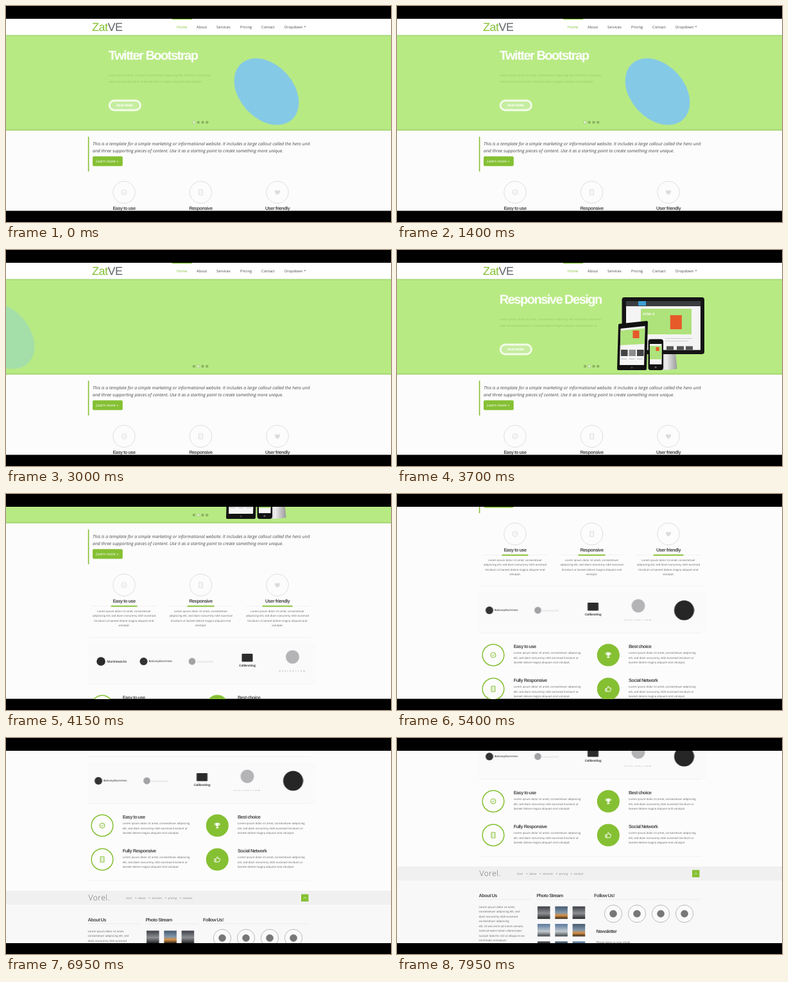
Animation, 600 px wide and 338 px high, one loop 8000 ms. Source, as an HTML page:

```html
<!DOCTYPE html>
<html lang="en">
<head>
<meta charset="utf-8">
<title>Template tour</title>
<style>
html, body { margin: 0; width: 100%; height: 100%; overflow: hidden; background: #000; }
svg { display: block; width: 100%; height: 100%; }
text { font-family: "Open Sans", "Noto Sans", sans-serif; text-rendering: geometricPrecision; white-space: pre; }
.head { font: bold 7.4px "Liberation Sans", sans-serif; letter-spacing: -.075em; fill: #4c4c4c; }
.title { font: bold 20px "Liberation Sans", sans-serif; letter-spacing: -.075em; fill: #fff; }
.nav { font-size: 5.75px; fill: #484848; }
.body { font-size: 4.3px; fill: #606060; }
.intro { font-size: 6.89px; font-style: italic; fill: #484848; }
.blurb { font-size: 4.7px; font-style: italic; fill: #96c468; }
.mid { text-anchor: middle; }
.line { fill: none; stroke: currentColor; }
</style>
</head>
<body>
<svg viewBox="0 0 600 338" preserveAspectRatio="none">
  <defs>
    <clipPath id="view"><rect y="20" width="600" height="300.5"/></clipPath>
    <clipPath id="strip"><rect x="128" y="374" width="354" height="72"/></clipPath>
    <linearGradient id="hero" x2="0" y2="1">
      <stop stop-color="#a5d576"/><stop offset=".02" stop-color="#b8ea84"/>
      <stop offset=".98" stop-color="#b8ea84"/><stop offset="1" stop-color="#a0d070"/>
    </linearGradient>
    <linearGradient id="silver" x2="1">
      <stop stop-color="#9a9a9a"/><stop offset=".5" stop-color="#eee"/><stop offset="1" stop-color="#999"/>
    </linearGradient>
    <linearGradient id="storm" x2="0" y2="1">
      <stop stop-color="#3c3f45"/><stop offset=".55" stop-color="#8d8f93"/><stop offset="1" stop-color="#29292b"/>
    </linearGradient>
    <linearGradient id="dusk" x2="0" y2="1">
      <stop stop-color="#44596f"/><stop offset=".5" stop-color="#8398aa"/>
      <stop offset=".72" stop-color="#d98f43"/><stop offset="1" stop-color="#30291f"/>
    </linearGradient>
    <linearGradient id="sky" x2="0" y2="1">
      <stop stop-color="#56779b"/><stop offset=".6" stop-color="#c3cad0"/><stop offset="1" stop-color="#42464a"/>
    </linearGradient>
  </defs>
  <rect width="600" height="338"/>
  <g clip-path="url(#view)">
    <rect width="600" height="338" fill="#fdfcfd"/>
    <g id="page"></g>
  </g>
</svg>
<script>
const LOOP = 8000, GREEN = '#85c033';
const LOREM = ['Lorem ipsum dolor sit amet, consectetuer', 'adipiscing elit, sed diam nonummy nibh euismod',
  'tincidunt ut laoreet dolore magna aliquam erat', 'volutpat.'];
const WIDE = ['Lorem ipsum dolor sit amet, consectetuer adipiscing',
  'elit, sed diam nonummy nibh euismod tincidunt ut', 'laoreet dolore magna aliquam erat volutpat.'];

const text = (x, y, cls, words, extra = '') => `<text x="${x}" y="${y}" class="${cls}" ${extra}>${words}</text>`;
const lines = (x, y, step, cls, rows) => rows.map((row, i) => text(x, y + i * step, cls, row)).join('');
const rect = (x, y, w, h, fill, r = 0) => `<rect x="${x}" y="${y}" width="${w}" height="${h}" rx="${r}" fill="${fill}"/>`;
const disc = (x, y, r, fill, stroke = 'none', width = 1) =>
  `<circle cx="${x}" cy="${y}" r="${r}" fill="${fill}" stroke="${stroke}" stroke-width="${width}"/>`;
const rule = (x, y, w, color = '#ececec') => rect(x, y, w, .6, color);

const ICONS = {
  check: '<circle r="4" class="line"/><path class="line" d="M-1.8 0l1.4 1.5 2.6-3"/>',
  tower: '<path class="line" d="M-3 4.2v-8.4h6v8.4z"/><path class="line" stroke-dasharray="1 1" d="M-1.2-2.6v6M1.2-2.6v6"/>',
  heart: '<path fill="currentColor" d="M0 4C-7-.8-3.4-5.6 0-2.2 3.4-5.6 7-.8 0 4z"/>',
  cup: '<path fill="currentColor" d="M-2.4-4.2h4.8c0 4-.8 5-1.8 5.6v1.4h1.6v1.4h-4.4v-1.4h1.6V1.4C-1.6.8-2.4-.2-2.4-4.2z"/><path class="line" d="M-2.2-3h-2q0 2.6 2.4 3M2.2-3h2q0 2.6-2.4 3"/>',
  thumb: '<path class="line" d="M-4.4-.6h2v4.4h-2zM-2.4-.4L0-4.2q1.6 0 .8 2.8h3q.8.4.4 1.4l-1 3.4q-.4.6-1 .6h-4.6"/>'
};
const icon = (name, x, y, color) => `<g transform="translate(${x} ${y})" color="${color}">${ICONS[name]}</g>`;

const header = () => rect(0, 19, 600, 26, '#fff') + rect(259, 19, 31, 2.2, GREEN) +
  `<text x="134" y="38.5" style="font:18px 'Liberation Sans',sans-serif;letter-spacing:-.5px" fill="#606468"><tspan fill="${GREEN}">Zat</tspan>VE</text>` +
  [['Home', 266], ['About', 297], ['Services', 328], ['Pricing', 365], ['Contact', 398], ['Dropdown', 434]]
    .map(([word, x], i) => text(x, 34.6, 'nav', word, i ? '' : `style="fill:${GREEN}"`)).join('') +
  '<path d="M464.5 31.6h3l-1.5 1.8z" fill="#777"/>';

const caption = (n, title, rows) =>
  `<g id="title${n}">${text(159.8, 84, 'title', title)}</g>` +
  `<g id="blurb${n}">${lines(160, 109.9, 10, 'blurb', rows)}</g>` +
  `<g id="more${n}"><rect x="161.2" y="148" width="48.2" height="15" rx="7.5" fill="#c6eda0" stroke="#f4fbec" stroke-width="2.8"/>` +
  text(185, 157.4, 'mid', 'READ MORE', `style="font:bold 4.7px 'Liberation Sans',sans-serif;letter-spacing:-.35px" fill="#fff"`) + '</g>';

const tablet = () =>
  '<path d="M347 117.5L389 113L387 186L345 186z" fill="#121212" stroke="#121212" stroke-width="4" stroke-linejoin="round"/>' +
  '<path d="M348.5 123L386.5 119L385 180L347 180z" fill="#f5f5f5"/>' +
  '<path d="M348.5 126L386.4 122.5L386 147L348 149z" fill="#aee27a"/>' +
  rect(367.5, 126, 10, 12, '#e8592a') + [349, 361.5, 374].map((x, i) => rect(x, 156, 10.5, 10, i % 2 ? '#8c8c8c' : '#444')).join('') +
  [349, 361.5, 374].map(x => rect(x, 170, 9, 1, '#bbb')).join('') + disc(366, 184, 1.5, '#444');

const devices = () =>
  '<path d="M411 160h23l2.5 26q-16 3-34 1z" fill="url(#silver)"/>' +
  rect(350.5, 74, 128.5, 89, '#151515', 4) + rect(357, 80, 116, 76.5, '#f4f4f4') +
  rect(357, 80, 116, 8, '#3a3d40') + rect(376, 80, 12, 7, '#3f9fd0') +
  rect(380, 92, 79, 40, '#aee27a', 1) + text(383, 102, '', 'HTML 5', 'font-size="5" font-weight="700" fill="#fff"') +
  rect(425.8, 102, 18, 22, '#e8592a') + rect(418, 138, 42, 1, '#ccc') + rect(418, 142, 36, 1, '#ccc') +
  [420, 436, 450].map(x => rect(x, 150.5, 11, 6, '#555')).join('') +
  tablet() +
  rect(391.5, 139.5, 23.5, 48.5, '#121212', 4) + rect(394, 147, 18.5, 32, '#f5f5f5') + rect(394, 150, 18.5, 21, '#aee27a') +
  rect(403.5, 152, 5, 6, '#e8592a') + disc(403, 183.5, 1.8, '#555');

const hero = () => rect(0, 45.4, 600, 149.6, 'url(#hero)') +
  caption(1, 'Twitter Bootstrap', ['Lorem ipsum dolor sit amet, consectetuer adipiscing elit, sed diam nonummy',
    'nibh euismod tincidunt ut laoreet dolore magna aliquam erat volutpat']) +
  '<g id="image1"><ellipse rx="59" ry="42" transform="translate(406 134) rotate(48)" fill="#84c9e6"/></g>' +
  caption(2, 'Responsive Design', ['Lorem ipsum dolor sit amet, consectetuer adipiscing elit, sed diam nonummy',
    'nibh euismod tincidunt ut laoreet dolore magna aliquam erat volutpat. Ut']) +
  `<g id="image2">${devices()}</g>` +
  [0, 1, 2, 3].map(i => disc(293 + i * 6.75, 182, 2.3, '#8db563')).join('') +
  `<g id="dot">${disc(293, 182, 1.9, '#fff', '#9fc776', .6)}</g>`;

const intro = () => rect(127.8, 204.5, 1.6, 54.5, GREEN) +
  lines(135, 217.6, 11, 'intro', [
    'This is a template for a simple marketing or informational website. It includes a large callout called the hero unit',
    'and three supporting pieces of content. Use it as a starting point to create something more unique.']) +
  rect(135, 235.2, 46.8, 15.2, GREEN, 2) + text(140, 245, 'intro', 'Learn more »', 'style="fill:#fff;font-size:6.1px"');

const feature = (x, name, head, w) => disc(x, 291.5, 17.2, '#fdfcfd', '#d9d9dc', .9) + icon(name, x, 291.5, '#dcdcdf') +
  text(x, 319, 'head mid', head) + rule(x - 50, 324.4, 100) + rect(x - w / 2, 323.6, w, 2, GREEN) +
  lines(x, 333.8, 7.5, 'body mid', LOREM);

const partners = () => `<g clip-path="url(#strip)">${rect(128, 382, 354, 64, '#fbfafb')}<g id="logos">` +
  disc(148, 411, 6.8, '#2b2b2b') + text(157.5, 413, '', 'Marblewicks', 'font-size="5.1" font-weight="600" fill="#333"') +
  disc(214.5, 411, 6, '#333') + text(222.5, 412.2, '', 'BalconyDoctrines', 'font-size="4.3" font-weight="600" fill="#444"') +
  disc(290, 411, 5.4, '#a3a3a5') + text(297, 412.6, '', 'CALM ALCOVE', 'font-size="3.9" fill="#c3c3c6"') +
  rect(367.5, 399, 17, 12.5, '#2c2c2c', 1) + text(376, 418.5, 'mid', 'Calibrating', 'font-size="4.7" font-weight="700" fill="#333"') +
  disc(446.5, 404, 10.5, '#b4b4b6') + text(447, 427, 'mid', 'OVALHOLLOW', 'font-size="2.8" letter-spacing="2.4" fill="#777"') +
  disc(518, 411, 15.5, '#262626') + '</g></g>' + rule(128, 373, 347) + rule(128, 446, 347);

const benefit = (x, y, name, head, full) =>
  disc(x, y, 16.8, full ? GREEN : '#fdfcfd', GREEN, 1.5) + icon(name, x, y, full ? '#fff' : GREEN) +
  text(x + 31.7, y - 11, 'head', head) + lines(x + 31.7, y - 1.6, 7.3, 'body', WIDE);

const photos = () => ['storm', 'dusk', 'storm', 'sky', 'sky', 'dusk', 'storm', 'dusk', 'sky'].map((tone, i) =>
  rect(219 + i % 3 * 27.3, 645.5 + (i / 3 | 0) * 27.4, 19.6, 19.6, `url(#${tone})`)).join('');

const footer = () => rule(128, 567, 347) + rect(0, 583, 600, 22.4, '#f1f0f1') + rect(0, 605.4, 600, 120, '#f9f8f9') +
  text(128.5, 598, '', 'Vorel.', 'font-size="12" font-weight="300" letter-spacing=".5" fill="#666"') +
  [['start', 187], ['about', 206], ['services', 227], ['pricing', 252.5], ['contact', 275.5]].map(([word, x], i) =>
    text(x, 595.6, 'body', word, 'style="fill:#858585"') + (i ? disc(x - 3.6, 594.2, .8, '#888') : '')).join('') +
  rect(460, 588.5, 11.4, 11.4, GREEN) + '<path class="line" color="#d9efbd" d="M463.4 595.4l2.3-2.2 2.3 2.2"/>' +
  [['About Us', 127.5, 83], ['Photo Stream', 217.5, 83], ['Follow Us!', 307, 166]].map(([head, x, w]) =>
    text(x, 631, 'head', head) + rule(x, 634.5, w, '#e4e4e4')).join('') +
  lines(127.5, 647.6, 7.5, 'body', ['Lorem ipsum dolor sit amet,', 'consectetuer adipiscing elit, sed', 'diam nonummy nibh euismod',
    'consectetuer adipiscing', 'elit. Ut wisi enim ad minim veniam,', 'nostrud exerci tation ullamcorper',
    'suscipit lobortis nisl ut aliquip ex ea', 'commodo consequat.']) +
  photos() + [337, 374, 411, 448].map(x => disc(x, 657, 13.6, '#fafafa', '#b9b9b9', 1) + disc(x, 657, 5.8, '#777')).join('') +
  text(310.5, 687, 'head', 'Newsletter') + text(310.5, 703.2, 'body', 'Please leave us your email');

document.getElementById('page').innerHTML = header() + hero() + intro() +
  feature(184, 'check', 'Easy to use', 41) + feature(303.5, 'tower', 'Responsive', 42) + feature(423, 'heart', 'User friendly', 47) +
  partners() +
  benefit(150, 481, 'check', 'Easy to use') + benefit(329.3, 481, 'cup', 'Best choice', true) +
  benefit(150, 534, 'tower', 'Fully Responsive') + benefit(329.3, 534, 'thumb', 'Social Network', true) + footer();

// Each step: [time, x, y, opacity, easing towards the next step]
function play(id, steps) {
  const all = [[0, ...steps[0].slice(1, 4)], ...steps, [LOOP, ...steps.at(-1).slice(1, 4)]];
  document.getElementById(id).animate(all.map(([t, x, y = 0, opacity = 1, easing = 'linear']) =>
    ({ offset: t / LOOP, transform: `translate(${x}px, ${y}px)`, opacity, easing })),
    { duration: LOOP, iterations: Infinity });
}
const leave = (id, start) => play(id, [[start, 0, 0, 1, 'ease-in'], [start + 600, -660, 0, 0]]);
const enter = (id, start, span, from) => play(id, [[start, from, 0, 0, 'ease-in'], [start + span, 0, 0, 1]]);

const SWAP = 2050;
leave('title1', SWAP);
leave('more1', SWAP);
leave('blurb1', SWAP + 300);
leave('image1', SWAP + 500);
enter('title2', SWAP + 800, 600, 600);
enter('blurb2', SWAP + 800, 600, 600);
enter('image2', SWAP + 800, 600, 300);
enter('more2', SWAP + 1200, 400, 600);
play('dot', [[SWAP, 0], [SWAP, 6.75]]);
play('logos', [[4800, 0, 0, 1, 'ease-in-out'], [5250, -70.5]]);
play('page', [[3750, 0, 0, 1, 'ease-in-out'], [4150, 0, -149], [4200, 0, -152.8], [4350, 0, -152.8, 1, 'ease-in-out'],
  [4750, 0, -229], [5620, 0, -229, 1, 'ease-in-out'], [6400, 0, -344], [7350, 0, -344, 1, 'ease-in-out'], [7650, 0, -382]]);
</script>
</body>
</html>
```
